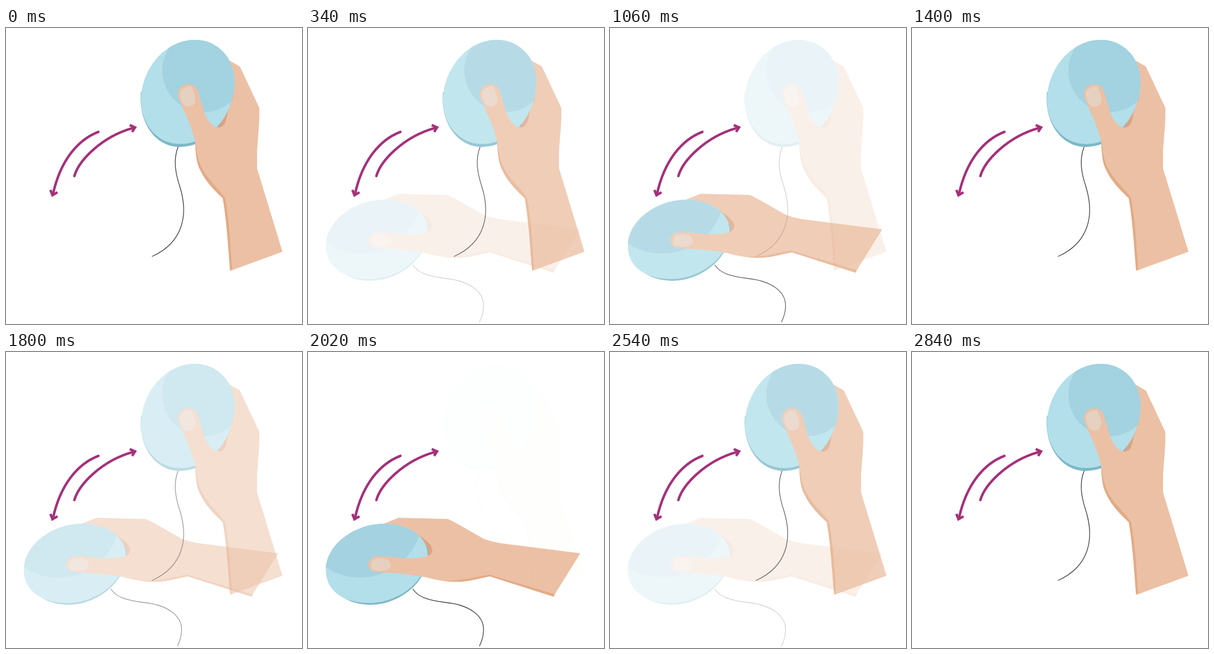
Write an HTML page that moves like this. It is 500 px wide and 500 px high and loops after 3200 ms.

```html
<!DOCTYPE html>
<html lang="en">
<head>
<meta charset="utf-8">
<title>Tilting hand</title>
<style>
  html, body { margin: 0; width: 100%; height: 100%; overflow: hidden; background: #fff; }
  svg { display: block; width: 100vw; height: 100vh; }
  .skin { fill: #ecc0a4; }
  .shade { fill: #e2ab85; }
  .crease { fill: #d9a483; }
  .nail { fill: #e6d0c0; }
  .ball { fill: #b2dfea; }
  .cap { fill: #a3d2e0; }
  .rim { fill: #7cb8c7; }
  .wire { fill: none; stroke: #444; stroke-width: 1.3; }
  .arrows { fill: none; stroke: #a5307a; stroke-width: 4.2; }
  .arrows .line { stroke-linecap: round; }
  #lower { opacity: 0; }
</style>
</head>
<body>
<svg viewBox="0 0 500 500">
  <defs>
    <path id="egg-up" d="M319 20C357 20 386 50 386 91C386 147 344 196 294 196C254 196 228 161 228 122C228 70 268 20 319 20Z"/>
    <path id="egg-low" d="M30 368C30 326 78 290 129 290C170 290 202 312 202 342C202 387 152 424 104 424C55 424 30 400 30 368Z"/>
    <clipPath id="clip-up"><use href="#egg-up"/></clipPath>
    <clipPath id="clip-low"><use href="#egg-low"/></clipPath>
  </defs>

  <g class="arrows">
    <path class="line" d="M156 175.500C121 189 92 224 79.500 280"/>
    <path d="M75 273.500L78.500 282.500L87 277.500"/>
    <path class="line" d="M115.500 250C123 224 161 184 214 169"/>
    <path d="M209 164L218 168L213 175.500"/>
  </g>

  <g id="lower">
    <path class="wire" d="M177 400C185 413 200 419 232 423C272 427 298 445 296.500 471C296 482 293 490 289.500 497"/>
    <path class="shade" d="M195 376C220 388 246 391 275 386L307 379L415 413.500L419 405L300 360Z"/>
    <path class="skin" d="M128 290L153 280L236 282C256 291 282 308 298 316C306 319 315 321 325 323L460 340L417 409L306 376L200 378L150 330Z"/>
    <path class="crease" d="M185 308C199 317 210 326 210 335C210 342 204 347 192 350L180 340Z"/>
    <path class="rim" d="M202 330C211 383 157 427 106 427C80 427 61 418 50 407L120 350Z"/>
    <use class="ball" href="#egg-low"/>
    <circle class="cap" cx="88" cy="275" r="106" clip-path="url(#clip-low)"/>
    <path class="skin" d="M102 358C104 348 110 345 122 345C136 345 150 348 168 348.500C186 349 203 346 207.500 341C211 337 211 332 208 327L306 330V376L270 383C248 387 224 388 205 382C190 378 165 375 150 374L115 371.500C106 371 102 365 102 358Z"/>
    <path class="nail" d="M111 350C118 348 128 348 133 350C142 354 142 365 133 368C125 371 114 370 108 368C105 362 107 354 111 350Z"/>
  </g>

  <g id="upper">
    <path class="wire" d="M291 200C282 222 286 245 294 269C308 315 300 362 246.500 386"/>
    <path class="shade" d="M319 190C321 215 321 226 328 240C337 260 354 276 366 287.500C372 320 375 365 378.500 410L390 406L385 280L340 200Z"/>
    <path class="skin" d="M374 53L395 65L428 135V150C427 180 422 215 424 237L467 378L382 409C379 366 377 322 370 287L350 180Z"/>
    <path class="crease" d="M384 115L355 166L358 170L369 168L376 150Z"/>
    <path class="rim" d="M228 108C223 155 249 201 294 201C327 200 348 181 361 163L381 124L300 100Z"/>
    <use class="ball" href="#egg-up"/>
    <circle class="cap" cx="334" cy="72" r="70" clip-path="url(#clip-up)"/>
    <path class="skin" d="M308 95C317 95 322 100 325 109L334 140C340 157 349 168 359 168C369 168 372 158 374 144L381 124L424 140V237L380 300L370 287C360 272 343 258 334 242C324 226 323 212 319.500 192C315 172 308 156 302 143L292 119C287 106 296 95 308 95Z"/>
    <path class="nail" d="M294 107C299 101 306 98 313 98L319 114C322 124 318 132 309 133C300 133 297 126 295 119C294 114 293 110 294 107Z"/>
  </g>
</svg>
<script>
  const LOOP = 3200, STEP = 20, FADE = 640;
  const upper = document.getElementById('upper');
  const lower = document.getElementById('lower');
  const start = performance.now();

  const ramp = (t, from) => Math.min(1, Math.max(0, (t - from) / FADE));

  // Closed form of cubic-bezier(1, 0, 0, 1)
  function ease(x) {
    const d = Math.cbrt((x - 0.5) / 4);
    return 0.5 + 1.5 * d - 2 * d ** 3;
  }

  function draw() {
    const now = Math.max(0, performance.now() - start);
    const t = Math.floor((now + 0.5) / STEP) * STEP % LOOP;
    const tilt = ease(ramp(t, 40) - ramp(t, 760) + ramp(t, 1480) - ramp(t, 2200));
    upper.style.opacity = 1 - tilt;
    lower.style.opacity = tilt;
    requestAnimationFrame(draw);
  }
  draw();
</script>
</body>
</html>
```
